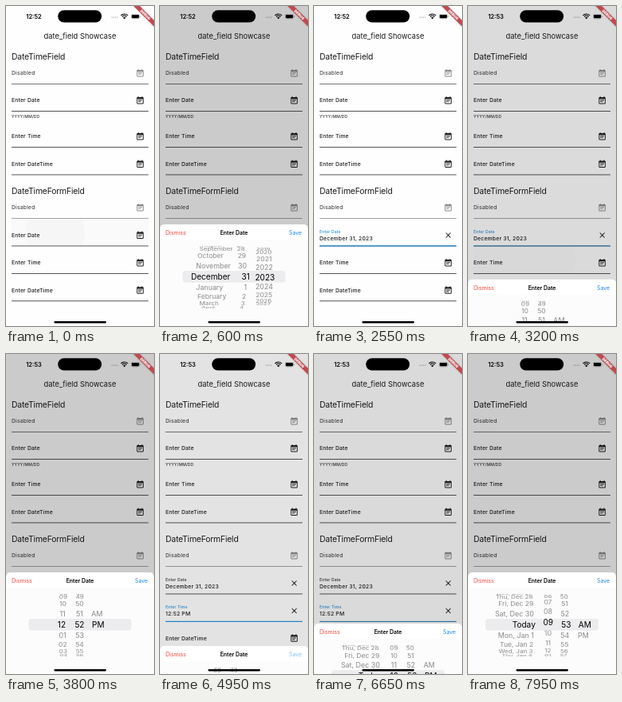
An HTML page with a canvas for the animation above (8000 ms loop, 186x400 px).

```html
<!DOCTYPE html>
<html lang="en">
<head>
<meta charset="utf-8">
<title>Date fields</title>
<style>
  html, body { margin: 0; width: 100%; height: 100%; overflow: hidden; background: #fefefe; }
  canvas { display: block; width: 186px; height: 400px; }
</style>
</head>
<body>
<canvas id="stage"></canvas>
<script>
const W = 186, H = 400, LOOP = 8000;
const SHEET_TOP = 273, MID = 338.3, BAND = 7.2;
const WHEEL_TOP = 300, WHEEL_END = 378;
const BLUE = '#2490dc', INK = '#1c1c1e';
const canvas = document.getElementById('stage');
const g = canvas.getContext('2d');
const dpr = window.devicePixelRatio || 1;
canvas.width = W * dpr;
canvas.height = H * dpr;

const NOTE = new Path2D('M17 10H7v2h10v-2zm2-7h-1V1h-2v2H8V1H6v2H5c-1.1 0-2 .9-2 2v14c0 1.1.9 2 2 2h14c1.1 0 2-.9 2-2V5c0-1.1-.9-2-2-2zm0 16H5V8h14v11zm-5-5H7v2h7v-2z');
const CROSS = new Path2D('M19 6.4 17.6 5 12 10.6 6.4 5 5 6.4 10.6 12 5 17.6 6.4 19 12 13.4 17.6 19 19 17.6 13.4 12z');
const MONTHS = ['January', 'February', 'March', 'April', 'May', 'June', 'July',
  'August', 'September', 'October', 'November', 'December'];

const clamp = v => Math.max(0, Math.min(1, v));
const mod = (a, n) => ((a % n) + n) % n;
const two = n => String(n).padStart(2, '0');
const easeOut = p => 1 - (1 - p) ** 3;

// cubic-bezier(.35, .91, .33, .97)
function slideEase(x) {
  if (x <= 0 || x >= 1) return clamp(x);
  const at = (s, a, b) => 3 * (1 - s) ** 2 * s * a + 3 * (1 - s) * s * s * b + s ** 3;
  let lo = 0, hi = 1;
  for (let i = 0; i < 20; i++) {
    const m = (lo + hi) / 2;
    if (at(m, .35, .33) < x) lo = m; else hi = m;
  }
  return at(lo, .91, .97);
}

function text(str, x, y, size, { color = INK, weight = 400, align = 'left', ls = 0 } = {}) {
  g.font = `${weight} ${size}px Inter, sans-serif`;
  g.letterSpacing = ls + 'px';
  g.textAlign = align;
  g.fillStyle = color;
  g.fillText(str, x, y + size * .36);
}

function box(x, y, w, h, r, color) {
  g.fillStyle = color;
  g.beginPath();
  g.roundRect(x, y, w, h, r);
  g.fill();
}

function icon(path, x, y, color) {
  g.save();
  g.translate(x, y);
  g.scale(.473, .473);
  g.translate(-12, -12);
  g.fillStyle = color;
  g.fill(path);
  g.restore();
}

function field(y, label, { value, disabled, focus = 0, faint } = {}) {
  const color = disabled ? '#4c4c4c' : INK;
  if (value) {
    const tint = focus > .5 ? BLUE : '#333';
    text(label, 7, y - 4.5, 5.1, { color: tint, weight: 500, ls: .13 });
    text(value, 7, y + 3.6, 6.8, { weight: 500, ls: .2 });
    icon(CROSS, 168.7, y, INK);
  } else {
    text(label, 7, y, 6.8, { color, weight: 500, ls: .17 });
    icon(NOTE, 168.6, y + .2, disabled ? '#8a8a8a' : INK);
  }
  g.fillStyle = disabled ? (faint ? '#999' : '#666') : '#444';
  g.fillRect(7, y + 13, 172, .9);
  if (focus > 0) {
    g.globalAlpha = focus;
    g.fillStyle = BLUE;
    g.fillRect(7, y + 12.8, 172, 1.2);
    g.globalAlpha = 1;
  }
}

function statusBar(t) {
  text(t < 3100 ? '12:52' : '12:53', 35, 13, 7.5, { weight: 600, align: 'center', color: '#000' });
  box(65.2, 5.2, 55, 15.2, 7.6, '#000');
  for (let i = 0; i < 4; i++) box(132.6 + i * 2.2, 13.4, 1.3, 1.3, .6, '#999');
  g.strokeStyle = '#000';
  g.lineWidth = 1.2;
  for (const r of [6, 3.8]) {
    g.beginPath();
    g.arc(148.8, 16, r, -Math.PI * .76, -Math.PI * .24);
    g.stroke();
  }
  g.fillStyle = '#000';
  g.beginPath();
  g.moveTo(148.8, 16.3);
  g.arc(148.8, 16.3, 2.3, -Math.PI * .76, -Math.PI * .24);
  g.fill();
  g.strokeStyle = '#999';
  g.lineWidth = .5;
  g.beginPath();
  g.roundRect(157.3, 10.3, 10.6, 5.6, 1.7);
  g.stroke();
  box(158, 11, 9.2, 4.2, 1.1, '#000');
  box(168.5, 12.2, .7, 1.8, .3, '#999');
}

function ribbon() {
  g.save();
  g.translate(W, 0);
  g.rotate(Math.PI / 4);
  g.shadowColor = 'rgba(0,0,0,.3)';
  g.shadowBlur = 2 * dpr;
  g.fillStyle = '#c04a50';
  g.fillRect(-19, 12.7, 38, 5.4);
  g.shadowBlur = 0;
  g.shadowColor = 'transparent';
  text('DEBUG', 0, 15.4, 4.6, { color: '#fff', weight: 900, align: 'center' });
  g.restore();
}

// One picker column; the middle band shows a magnified copy.
function wheel({ pivot, x, align = 'left', at, label, min = -Infinity, max = Infinity, k = 1 }) {
  const radius = 52 * k;
  const pass = inside => {
    g.save();
    g.beginPath();
    if (inside) g.rect(0, MID - BAND, W, BAND * 2);
    else {
      g.rect(0, WHEEL_TOP, W, MID - BAND - WHEEL_TOP);
      g.rect(0, MID + BAND, W, WHEEL_END - MID - BAND);
    }
    g.clip();
    const zoom = inside ? 1.12 : 1;
    const from = Math.max(min, Math.ceil(at - 4.3)), to = Math.min(max, Math.floor(at + 4.3));
    for (let i = from; i <= to; i++) {
      const a = (i - at) * .27;
      const depth = 1 + .356 * (1 - Math.cos(a));
      g.save();
      g.translate(pivot, MID + zoom * radius * Math.sin(a) / depth);
      g.scale(zoom / depth, zoom * Math.cos(a) / depth);
      text(label(i), x - pivot, 0, 9, { align, color: inside ? '#000' : 'rgba(0,0,0,.46)' });
      g.restore();
    }
    g.restore();
  };
  pass(false);
  pass(true);
}

const hour12 = i => two(mod(i - 1, 12) + 1);
const minute = i => two(mod(i, 60));
const noon = i => i ? 'PM' : 'AM';
const day = i => {
  if (i === 0) return 'Today';
  const [w, d, m] = new Date(Date.UTC(2023, 11, 31 + i)).toUTCString().split(' ');
  return `${w} ${m} ${+d}`;
};

function datePicker() {
  box(28.5, MID - BAND, 129, BAND * 2, 3.5, '#ececee');
  wheel({ pivot: 93, x: 44.7, at: 11, label: i => MONTHS[mod(i, 12)] });
  wheel({ pivot: 82, x: 109.5, align: 'right', at: 31, label: i => mod(i - 1, 31) + 1 });
  wheel({ pivot: 124, x: 131, align: 'center', at: 2022.95, label: String, k: .9 });
}

function timePicker() {
  box(28.5, MID - BAND, 129, BAND * 2, 3.5, '#ececee');
  wheel({ pivot: 80, x: 71, align: 'center', at: 12, label: hour12 });
  wheel({ pivot: 93, x: 92.5, align: 'center', at: 52, label: minute });
  wheel({ pivot: 103, x: 114.5, align: 'center', at: 1, label: noon, min: 0, max: 1 });
}

function dateTimePicker(t) {
  const nudge = t >= 7600 ? .2 : 0;
  const hour = 12 - nudge - 2.6 * easeOut(clamp((t - 7720) / 260));
  const half = 1 - easeOut(clamp((t - 7725) / 220));
  box(22, MID - BAND, 142, BAND * 2, 3.5, '#ececee');
  wheel({ pivot: 68, x: 83, align: 'right', at: 0, label: day });
  wheel({ pivot: 99, x: 100.5, align: 'center', at: hour, label: hour12 });
  wheel({ pivot: 110, x: 122, align: 'center', at: 53, label: minute });
  wheel({ pivot: 130, x: 145, align: 'center', at: half, label: noon, min: 0, max: 1 });
}

const SHEETS = [
  { tap: -150, open: 35, press: 1900, tapY: 283, row: 266, picker: datePicker },
  { tap: 2850, open: 3130, press: 4800, tapY: 318, row: 300, picker: timePicker },
  { tap: 6480, open: 6574, press: Infinity, tapY: 352, row: 335, picker: dateTimePicker }
];

function ripple(t, { tap, tapY, row }) {
  const p = (t - tap) / 500;
  if (p <= 0 || p >= 1) return;
  g.save();
  g.beginPath();
  g.rect(7, row, 172, 34);
  g.clip();
  g.fillStyle = `rgba(0,0,0,${.02 * (1 - p)})`;
  g.fillRect(7, row, 172, 34);
  g.beginPath();
  g.arc(62, tapY, 10 + 90 * p, 0, 7);
  g.fill();
  g.restore();
}

function page(t) {
  g.fillStyle = '#fefefe';
  g.fillRect(0, 0, W, H);
  statusBar(t);
  text('date_field Showcase', 93, 37.5, 9.35, { align: 'center' });
  text('DateTimeField', 7, 63, 10.4, { ls: -.2 });
  field(84, 'Disabled', { disabled: true });
  field(118, 'Enter Date');
  text('YYYY/MM/DD', 7, 138.5, 5, { color: '#333', weight: 500, ls: .14 });
  field(163, 'Enter Time');
  field(197.5, 'Enter DateTime');
  text('DateTimeFormField', 7, 231.3, 10.4, { ls: -.2 });
  field(252, 'Disabled', { disabled: true, faint: true });
  const [a, b, c] = SHEETS;
  const blur = next => 1 - clamp((t - next.open - 20) / 170);
  field(286.5, 'Enter Date', t >= a.press
    ? { value: 'December 31, 2023', focus: blur(b) } : {});
  field(321, 'Enter Time', t >= b.press
    ? { value: '12:52 PM', focus: blur(c) } : {});
  field(355.3, 'Enter DateTime');
  SHEETS.forEach(s => ripple(t, s));
}

function sheet(t, s) {
  const shown = t < s.press + 60
    ? slideEase((t - s.open) / 400)
    : 1 - slideEase((t - s.press - 60) / 300);
  if (shown <= 0) return;
  g.fillStyle = `rgba(0,0,0,${.2 * Math.sqrt(shown)})`;
  g.fillRect(0, 0, W, H);
  g.save();
  g.translate(0, (1 - shown) * (H - SHEET_TOP));
  box(0, SHEET_TOP, W, H, 5, '#fff');
  g.fillStyle = '#fcfcfc';
  g.fillRect(0, 292, W, H);
  text('Dismiss', 7, 283.4, 7, { color: '#f5453c' });
  text('Enter Date', 93, 283.4, 6.9, { weight: 600, align: 'center', color: '#000' });
  g.globalAlpha = t >= s.press ? .55 : 1;
  text('Save', 178, 283.4, 6.9, { color: '#1a86f0', align: 'right' });
  g.globalAlpha = 1;
  s.picker(t);
  g.restore();
}

function draw(t) {
  g.setTransform(dpr, 0, 0, dpr, 0, 0);
  page(t);
  SHEETS.forEach(s => sheet(t, s));
  ribbon();
  box(60.4, 394.1, 65.6, 2.3, 1.15, '#000');
}

const start = performance.now();
function tick() {
  draw((performance.now() - start) % LOOP);
  requestAnimationFrame(tick);
}
tick();
</script>
</body>
</html>
```
